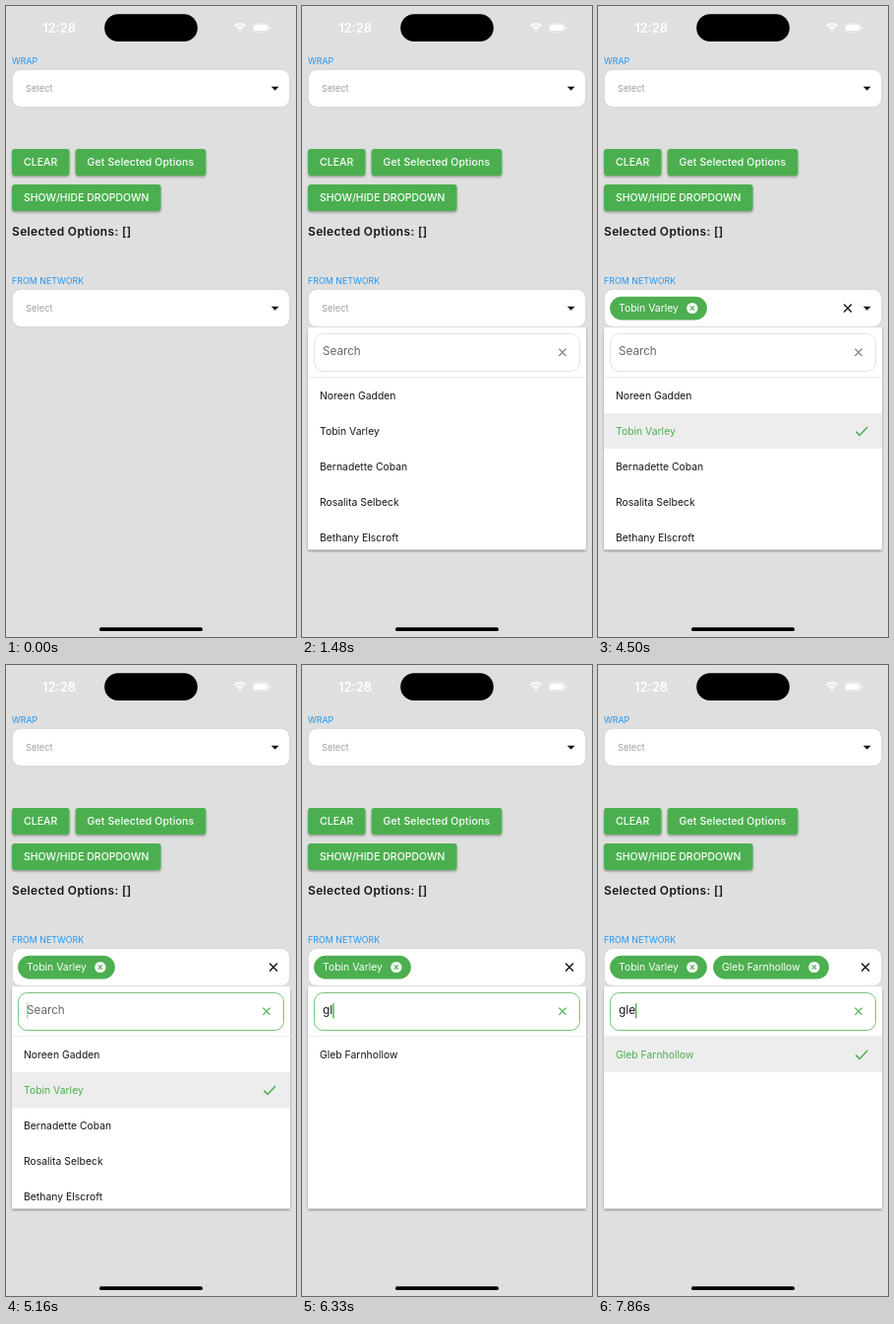
These frames come from a looping animation (295 px wide and 640 px high, 8000 ms). An HTML page:

```html
<!DOCTYPE html>
<html lang="en">
<head>
<meta charset="utf-8">
<title>Multi select dropdown</title>
<style>
html, body { margin: 0; width: 100%; height: 100%; overflow: hidden; background: #dfdfdf; }
svg { display: block; width: 295px; height: 640px; font-family: Inter, "Open Sans", sans-serif; }
text { white-space: pre; }
</style>
</head>
<body>
<svg id="stage" viewBox="0 0 295 640" xmlns="http://www.w3.org/2000/svg">
  <defs>
    <filter id="lift" x="-10%" y="-20%" width="120%" height="160%">
      <feDropShadow dx="0" dy="1.5" stdDeviation="1" flood-opacity=".32"/>
    </filter>
    <filter id="float" x="-5%" y="-5%" width="110%" height="112%">
      <feDropShadow dx="0" dy="1.6" stdDeviation="1.2" flood-opacity=".38"/>
    </filter>
    <clipPath id="panelClip"><rect x="6" y="326" width="283" height="225.3"/></clipPath>
  </defs>
</svg>
<script>
const LOOP = 8000;
const GREEN = '#4caf50', INK = '#161616', BLUE = '#2196f3';
const stage = document.getElementById('stage');

function add(parent, tag, attrs, content) {
  const el = document.createElementNS('http://www.w3.org/2000/svg', tag);
  for (const k in attrs) el.setAttribute(k, attrs[k]);
  if (content) el.textContent = content;
  return parent.appendChild(el);
}
const group = (parent, attrs = {}) => add(parent, 'g', attrs);
const box = (parent, x, y, width, height, rx, fill, more) =>
  add(parent, 'rect', { x, y, width, height, rx, fill, ...more });
const label = (parent, x, y, size, fill, str, more) =>
  add(parent, 'text', { x, y, 'font-size': size, fill, ...more }, str);
const line = (parent, d, stroke, width) =>
  add(parent, 'path', { d, stroke, fill: 'none', 'stroke-width': width });
const cross = (parent, x, y, r, stroke, width) =>
  line(parent, `M${x - r} ${y - r}l${2 * r} ${2 * r}m0 ${-2 * r}l${-2 * r} ${2 * r}`, stroke, width);
const show = (el, on) => el.setAttribute('opacity', +on);

function field(y) {
  box(stage, 6.3, y + .3, 282.4, 38.4, 9, '#fff', { stroke: '#c9c9c9', 'stroke-width': .7 });
}
const arrow = (parent, y) => add(parent, 'path', { d: `M269.8 ${y}h7.8l-3.9 3.9z`, fill: INK });

function button(x, y, width, str, spacing = 0) {
  box(stage, x, y, width, 27, 3, GREEN, { filter: 'url(#lift)' });
  label(stage, x + 12, y + 17.1, 10.5, '#fff', str, { 'font-weight': 500, 'letter-spacing': spacing });
}

function chip(x, width, str) {
  const g = group(stage);
  box(g, x, 294.8, width, 23.6, 11.8, GREEN);
  label(g, x + 9, 310.3, 10.4, '#fff', str);
  add(g, 'circle', { cx: x + width - 15, cy: 306.5, r: 5.6, fill: '#fff' });
  cross(g, x + width - 15, 306.5, 2.2, GREEN, 1.2);
  return g;
}

// Status bar
label(stage, 37, 26.5, 13, '#fff', '12:28', { 'font-weight': 600 });
box(stage, 100.2, 8.3, 94.6, 27.8, 13.9, '#000');
add(stage, 'path', { d: 'M232 19.6q6-5 12 0l-1.3 1.4q-4.7-3.8-9.4 0zM234.2 22q3.8-3.1 7.6 0l-1.3 1.4q-2.5-2-5 0zM236.3 24.2q1.7-1.3 3.4 0L238 26z', fill: '#fff' });
box(stage, 250.6, 17.4, 17, 9, 2.8, 'none', { stroke: '#fff', 'stroke-opacity': .5, 'stroke-width': .8 });
box(stage, 252, 18.8, 14.2, 6.2, 1.6, '#fff');
box(stage, 268.7, 20.4, 1, 3, .5, '#fff', { opacity: .6 });

// Page
label(stage, 6, 58.5, 8.9, BLUE, 'WRAP');
field(64);
label(stage, 20, 86.5, 9.4, '#a0a0a0', 'Select');
arrow(stage, 81.8);
button(6, 145, 58.6, 'CLEAR');
button(70.6, 145, 132.8, 'Get Selected Options', .12);
button(6, 181, 151.6, 'SHOW/HIDE DROPDOWN');
label(stage, 6, 233, 12, INK, 'Selected Options: []', { 'font-weight': 600, 'letter-spacing': .33 });
label(stage, 6, 281.7, 8.9, BLUE, 'FROM NETWORK');
field(287);
const placeholder = label(stage, 20, 309.7, 9.4, '#a0a0a0', 'Select');
const mainArrow = arrow(stage, 304.8);
const chips = [chip(12.1, 98.8, 'Tobin Varley'), chip(117.1, 117.8, 'Gleb Farnhollow')];
const clear = group(stage);
cross(clear, 0, 306.5, 3.9, INK, 1.4);
box(stage, 95, 630.3, 105, 3.7, 1.85, '#000');

// Dropdown panel
const panel = group(stage);
box(panel, 6, 326, 283, 225.3, 1, '#fff', { filter: 'url(#float)' });
const inner = group(panel, { 'clip-path': 'url(#panelClip)' });
const frame = box(inner, 12.5, 332.5, 270, 38, 9, '#fff', { 'stroke-width': .75 });
const hint = label(inner, 21, 354.4, 11.7, '#666', 'Search');
const query = label(inner, 21, 354.4, 12, INK, '');
const caret = box(inner, 0, 343, 1.4, 15.5, .7, GREEN);
const wipe = cross(inner, 265, 351.3, 3.6, '#757575', 1.2);
line(inner, 'M6 376.5h283', '#ececec', .8);

const rows = [0, 1, 2, 3, 4].map(i => {
  const y = 377 + i * 36;
  const bg = box(inner, 6, y, 283, 36, 0, '#ededed');
  const name = label(inner, 18, y + 21.8, 10.4, INK, '');
  const tick = line(inner, `M262.3 ${y + 18.6}l3.8 3.8 8-8.4`, GREEN, 1.5);
  return { bg, name, tick };
});

// Behaviour
const PEOPLE = ['Noreen Gadden', 'Tobin Varley', 'Bernadette Coban', 'Rosalita Selbeck',
  'Bethany Elscroft', 'Gleb Farnhollow'];
const CARET_X = [21, 28.2, 31.2, 38];

// Each track lists [start time, value]; a value holds until the next one.
const TRACKS = {
  open: [[0, 0], [1480, 1]],
  picked: [[0, 0], [2840, 1], [7650, 2]],
  focus: [[0, 0], [4610, .5], [4720, .9], [4840, 1]],
  typed: [[0, ''], [5370, 'g'], [6220, 'gl'], [6650, 'gle']],
  hint: [[0, 1], [5370, .9], [5480, .4], [5590, 0]],
  caret: [[0, 0], [4610, 1], [5160, .5], [5270, 0], [5370, 1], [5800, .5], [5890, 0],
    [6220, 1], [7200, .4], [7320, 0], [7750, .5], [7860, 1]],
  tint0: [[0, 0], [7750, .5], [7860, 1]],
  tint1: [[0, 0], [2950, 1], [5480, .5], [5590, 0]]
};
const at = (track, t) => track.reduce((v, [start, value]) => t >= start ? value : v, track[0][1]);

function mix(from, to, k) {
  return `rgb(${from.map((v, i) => Math.round(v + (to[i] - v) * k))})`;
}
const INK_RGB = [22, 22, 22], GREEN_RGB = [76, 175, 80];

function render(t) {
  const s = {};
  for (const k in TRACKS) s[k] = at(TRACKS[k], t);
  const focused = s.focus > 0;

  show(panel, s.open);
  show(placeholder, !s.picked);
  chips.forEach((c, i) => show(c, s.picked > i));
  show(mainArrow, !focused);
  show(clear, s.picked > 0);
  clear.setAttribute('transform', `translate(${focused ? 272 : 254})`);

  frame.setAttribute('stroke', mix([218, 218, 218], GREEN_RGB, s.focus));
  wipe.setAttribute('stroke', mix([117, 117, 117], GREEN_RGB, s.focus));
  show(hint, s.hint);
  query.textContent = s.typed;
  caret.setAttribute('x', CARET_X[s.typed.length]);
  show(caret, s.caret);

  const chosen = ['Tobin Varley', 'Gleb Farnhollow'].slice(0, s.picked);
  const found = PEOPLE.filter(p => p.toLowerCase().includes(s.typed));
  rows.forEach((row, i) => {
    const on = chosen.includes(found[i]);
    row.name.textContent = found[i] || '';
    row.name.setAttribute('fill', mix(INK_RGB, GREEN_RGB, [s.tint0, s.tint1][i] || 0));
    show(row.bg, on);
    show(row.tick, on);
  });
}

const begin = performance.now();
function tick() {
  render((performance.now() - begin) % LOOP);
  requestAnimationFrame(tick);
}
render(0);
requestAnimationFrame(tick);
</script>
</body>
</html>
```
